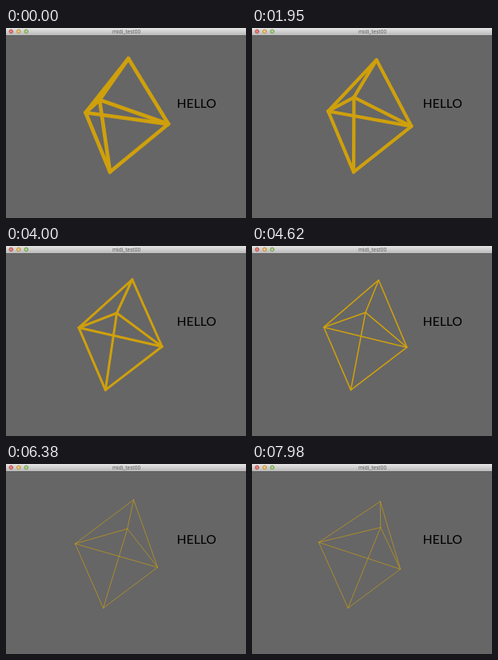
Write an HTML page with a canvas that moves like this. It is 300x238 px and loops after 8000 ms.

```html
<!DOCTYPE html>
<html lang="en">
<head>
<meta charset="utf-8">
<title>midi_test00</title>
<style>
  html, body { margin: 0; width: 100%; height: 100%; overflow: hidden; background: #666; }
  canvas { display: block; }
</style>
</head>
<body>
<canvas id="stage" width="300" height="238"></canvas>
<script>
const ctx = document.getElementById('stage').getContext('2d');
const LOOP = 8000, STEP = 7980 / 90;

// Each vertex: position at the start, middle and end of the turn.
const vertices = {
  top:    [[153, 38.3], [157.8, 42], [160.3, 47]],
  left:   [[99.5, 106], [91, 102.3], [83.5, 98.2]],
  inner:  [[117, 90], [138.5, 84], [160.7, 79.5]],
  right:  [[203, 120.3], [195, 126], [185.5, 131.7]],
  bottom: [[130, 180.3], [124.3, 180.4], [120, 180.4]]
};
const edges = [
  ['top', 'left'], ['top', 'inner'], ['top', 'right'],
  ['left', 'inner'], ['inner', 'right'], ['right', 'left'],
  ['bottom', 'left'], ['bottom', 'inner'], ['bottom', 'right']
];
// Line weight over time: [ms, px]
const weights = [[0, 4.7], [1950, 4.2], [3190, 3.7], [4000, 3], [5000, 0.65], [LOOP, 0.65]];

// Parabola through three values at u = 0, 0.5 and 1
const curve = (a, b, c, u) =>
  a * (1 - u) * (1 - 2 * u) + 4 * b * u * (1 - u) + c * u * (2 * u - 1);

function weightAt(t) {
  const i = weights.findIndex(([time]) => time > t);
  const [t0, w0] = weights[i - 1], [t1, w1] = weights[i];
  return w0 + (w1 - w0) * (t - t0) / (t1 - t0);
}

function drawWindow() {
  ctx.fillStyle = '#666';
  ctx.fillRect(0, 0, 300, 238);
  const bar = ctx.createLinearGradient(0, 0, 0, 9);
  bar.addColorStop(0, '#e6e6e6');
  bar.addColorStop(1, '#b9b9b9');
  ctx.fillStyle = bar;
  ctx.fillRect(0, 0, 300, 9);
  ctx.fillStyle = '#555';
  ctx.fillRect(0, 9, 300, 0.6);
  // Window buttons: darker rim, lighter centre
  [['#b8524c', '#e88078'], ['#bd8f3f', '#efc779'], ['#72994f', '#acd48a']].forEach(([rim, centre], i) => {
    ctx.fillStyle = centre;
    ctx.strokeStyle = rim;
    ctx.lineWidth = 1;
    ctx.beginPath();
    ctx.arc(6.3 + i * 9.5, 4.3, 2.3, 0, 2 * Math.PI);
    ctx.fill();
    ctx.stroke();
  });
  ctx.textAlign = 'center';
  ctx.fillStyle = '#5c5c5c';
  ctx.font = '6.5px "Noto Sans", sans-serif';
  ctx.fillText('midi_test00', 150.5, 6.5);
  ctx.textAlign = 'left';
  ctx.fillStyle = '#000';
  ctx.font = '15.7px Lato, sans-serif';
  ctx.fillText('HELLO', 213.6, 100);
}

function drawSolid(t) {
  const u = t / 7980;
  const points = {};
  for (const [name, [a, b, c]] of Object.entries(vertices))
    points[name] = [0, 1].map(k => curve(a[k], b[k], c[k], u));
  ctx.strokeStyle = '#cfa00c';
  ctx.lineWidth = weightAt(t);
  ctx.lineCap = 'round';
  for (const [from, to] of edges) {
    ctx.beginPath();
    ctx.moveTo(...points[from]);
    ctx.lineTo(...points[to]);
    ctx.stroke();
  }
}

function render(now) {
  const t = Math.floor((now % LOOP + 4) / STEP) * STEP;
  drawWindow();
  drawSolid(t);
  requestAnimationFrame(render);
}
requestAnimationFrame(render);
</script>
</body>
</html>
```
